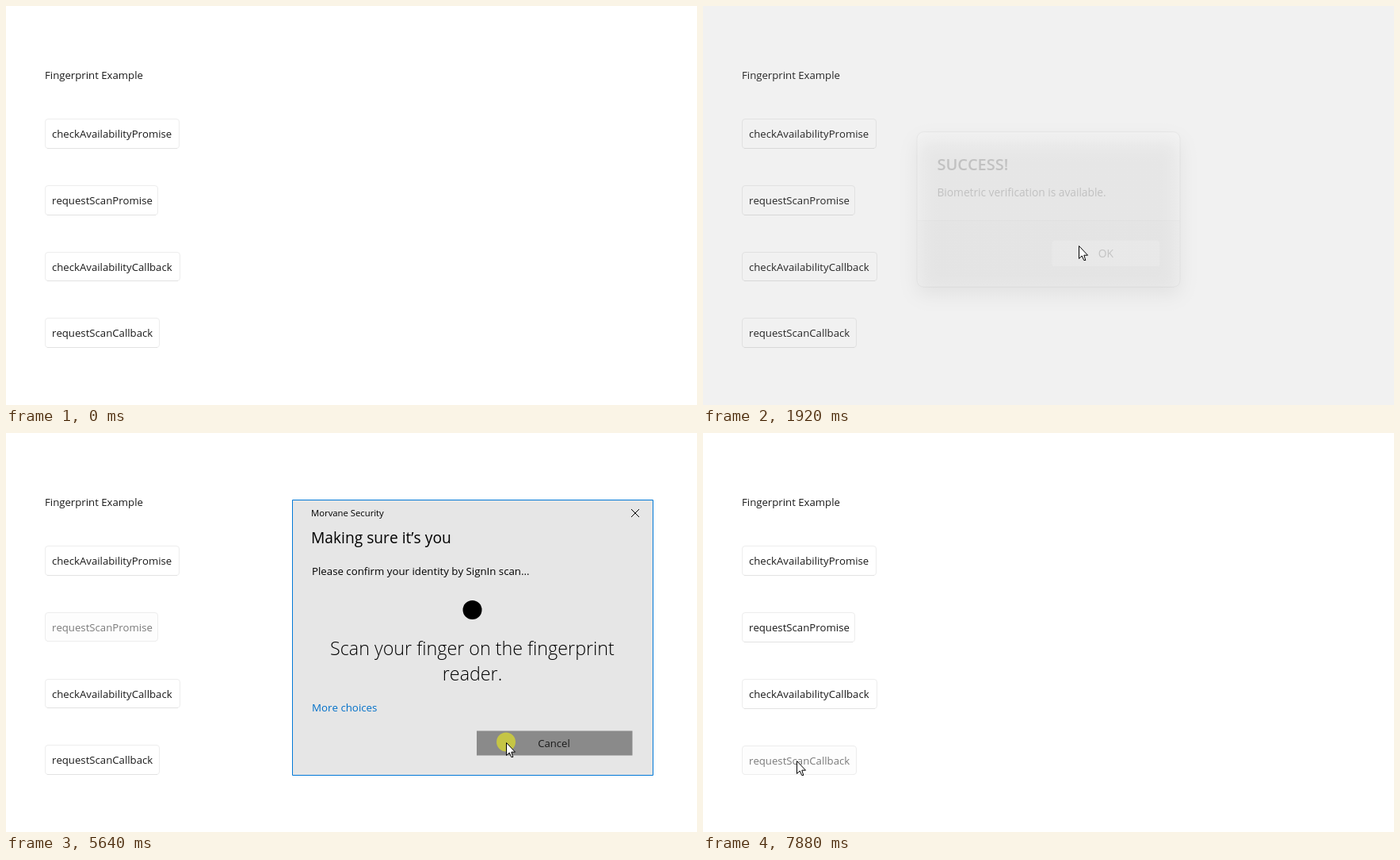
Animation of 872 by 503 pixels, one loop 8000 ms. Source, as an HTML page with a canvas:

```html
<!DOCTYPE html>
<html lang="en">
<head>
<meta charset="utf-8">
<title>Fingerprint Example</title>
<style>
  html, body { margin: 0; overflow: hidden; background: #fff; }
  canvas { display: block; }
</style>
</head>
<body>
<canvas id="stage" width="872" height="503"></canvas>
<script>
const ctx = document.getElementById('stage').getContext('2d');
const LOOP = 8000, STEP = 40, FADE = 195;
const INK = '#1a1a1a';
const ARROW = new Path2D('M0 0V16L3.7 12.5L6.2 18H8.3L6.3 11.7H11Z');

// time, x, y, upward bend of the path leading to the next point
const CURSOR = [
  [80, 707, 454], [800, 141, 164], [1120, 141, 164], [1640, 474, 302],
  [2160, 474, 302], [2800, 109, 240], [3560, 109, 240, 50], [3960, 321, 435],
  [4760, 481, 503], [5560, 631, 390], [5760, 631, 390], [6360, 518, 317],
  [6520, 510, 312], [6840, 510, 312], [7520, 118, 413]
];
const CLICKS = [[840, 920], [1680, 1760], [3120, 3240], [5640, 5720], [6720, 6800], [7760, 7880]];

// label, top, width, height, and when it is held down
const BUTTONS = [
  ['checkAvailabilityPromise', 142, 170, 38, 840, 920],
  ['requestScanPromise', 226, 143, 38, 3120, 5760],
  ['checkAvailabilityCallback', 310, 171, 37],
  ['requestScanCallback', 393, 145, 38, 7760, LOOP]
];
const DIALOGS = [
  { open: 900, close: 1760, title: 'SUCCESS!', body: 'Biometric verification is available.' },
  { open: 5780, close: 6800, title: 'ERROR:', body: 'Error: Verification was canceled' }
];
const SECURITY = [4520, 5720];

// white content above a grey footer, split by a hairline at y = 269
const PANEL = ctx.createLinearGradient(0, 163, 0, 350);
[[163, '#fff'], [269, '#fff'], [269, '#e0e0e0'], [270, '#e0e0e0'], [270, '#f3f3f3'], [350, '#f3f3f3']]
  .forEach(([y, color]) => PANEL.addColorStop((y - 163) / 187, color));

const within = (t, [from, to]) => t >= from && t < to;
const clamp = v => Math.max(0, Math.min(1, v));
const smooth = u => u * u * (3 - 2 * u);

function text(str, x, y, size = 13.2, color = INK, align = 'left', weight = 400) {
  ctx.font = `${weight} ${size}px "Open Sans", "Noto Sans", sans-serif`;
  ctx.fontKerning = 'none';
  ctx.textAlign = align;
  ctx.fillStyle = color;
  ctx.fillText(str, x, y);
}

function box(x, y, w, h, radius, fill, stroke) {
  ctx.beginPath();
  ctx.roundRect(x, y, w, h, radius);
  if (fill) { ctx.fillStyle = fill; ctx.fill(); }
  if (stroke) { ctx.strokeStyle = stroke; ctx.lineWidth = 1; ctx.stroke(); }
}

function disc(x, y, color) {
  ctx.beginPath();
  ctx.arc(x, y, 12, 0, 7);
  ctx.fillStyle = color;
  ctx.fill();
}

function softButton(x, y, w, h, fill, underline) {
  box(x + .5, y + .5, w - 1, h - 1, 3.5, fill, '#ededed');
  ctx.fillStyle = underline;
  ctx.fillRect(x + 3, y + h - 1, w - 6, 1);
}

function cursorAt(t) {
  if (t < 80 || within(t, [3960, 4800])) return null;
  const next = CURSOR.findIndex(key => key[0] > t);
  if (next < 0) return CURSOR[CURSOR.length - 1].slice(1);
  const [t0, x0, y0, bend = 0] = CURSOR[next - 1], [t1, x1, y1] = CURSOR[next];
  const u = smooth((t - t0) / (t1 - t0));
  return [x0 + (x1 - x0) * u, y0 + (y1 - y0) * u - bend * Math.sin(Math.PI * u)];
}

function drawPage(t) {
  const settled = t >= 7760 ? 1 : 0;
  text('Fingerprint Example', 49, 92);
  BUTTONS.forEach(([label, top, w, height, from, to], i) => {
    const pressed = within(t, [from, to]);
    const shift = i === 3 ? settled : 0;
    const h = pressed ? 37 : height + (i === 2 ? settled : 0);
    softButton(49, top + shift, w, h, pressed ? '#fdfdfd' : '#fff', pressed ? '#ededed' : '#e2e2e2');
    text(label, 58, top + 24 + shift, 13.2, pressed ? '#7a7a7a' : INK);
  });
}

function drawDialog(t, { open, close, title, body }, [mx, my]) {
  const shown = Math.min(clamp((t - open) / FADE), clamp(1 - (t - close) / FADE));
  if (!shown) return;
  ctx.fillStyle = `rgba(135,135,135,${.65 * shown})`;
  ctx.fillRect(0, 0, 872, 503);

  ctx.save();
  const scale = 1 + .05 * (1 - shown);
  ctx.translate(436, 256.5);
  ctx.scale(scale, scale);
  ctx.translate(-436, -256.5);
  ctx.globalAlpha = shown;
  ctx.shadowColor = 'rgba(0,0,0,.37)';
  ctx.shadowBlur = 25;
  ctx.shadowOffsetY = 10;
  box(277, 163, 318, 187, 8, PANEL);
  ctx.shadowColor = 'transparent';
  box(276.5, 162.5, 319, 188, 8.5, null, 'rgba(0,0,0,.2)');
  text(title, 301, 209, 19.2, INK, 'left', 600);
  text(body, 301, 241);
  const hover = mx > 441 && mx < 571 && my > 294 && my < 326;
  softButton(440, 294, 131, 32, hover ? '#f6f6f6' : '#fcfcfc', '#cfcfcf');
  text('OK', 505.5, 315, 13.2, INK, 'center');
  ctx.restore();
}

function drawSecurity(t, [mx, my]) {
  box(361.5, 84.5, 455, 347, 0, '#e6e6e6', '#0078d7');
  text('Morvane Security', 385, 105, 11.3, '#000');
  ctx.beginPath();
  for (const d of [-1, 1]) {
    ctx.moveTo(794 - 5 * d, 96);
    ctx.lineTo(794 + 5 * d, 106);
  }
  ctx.strokeStyle = '#000';
  ctx.stroke();
  text('Making sure it’s you', 385, 139, 19.2, '#000');
  text('Please confirm your identity by SignIn scan...', 386, 179, 13.25, '#000');
  disc(588.5, 223, '#000');
  text('Scan your finger on the fingerprint', 588.5, 280, 23.3, '#000', 'center', 300);
  text('reader.', 588.5, 312, 23.3, '#000', 'center', 300);
  text('More choices', 386, 351, 13.3, '#0070c9');
  const pressed = t >= 5600, hover = mx > 594 && my < 407;
  box(594, 375.5, 196.5, 31, 0, pressed ? '#8a8a8a' : '#ccc');
  if (hover && !pressed) box(594.5, 376, 195.5, 30, 0, null, '#7a7a7a');
  text('Cancel', 691.5, 396, 13.1, INK, 'center');
}

function drawCursor(t, [x, y]) {
  if (CLICKS.some(span => within(t, span))) disc(x, y - .5, 'rgba(255,255,0,.5)');
  ctx.save();
  ctx.translate(Math.round(x) + .5, Math.round(y) + .5);
  ctx.fillStyle = '#fff';
  ctx.fill(ARROW);
  ctx.strokeStyle = '#000';
  ctx.lineWidth = 1;
  ctx.lineJoin = 'round';
  ctx.stroke(ARROW);
  ctx.restore();
}

function draw(now) {
  const t = Math.floor(now % LOOP / STEP) * STEP;
  const cursor = cursorAt(t), pointer = cursor || [-1, -1];
  ctx.fillStyle = '#fff';
  ctx.fillRect(0, 0, 872, 503);
  drawPage(t);
  DIALOGS.forEach(dialog => drawDialog(t, dialog, pointer));
  if (within(t, SECURITY)) drawSecurity(t, pointer);
  if (cursor) drawCursor(t, cursor);
}

const start = performance.now();
(function frame() {
  draw(performance.now() - start);
  requestAnimationFrame(frame);
})();
</script>
</body>
</html>
```
